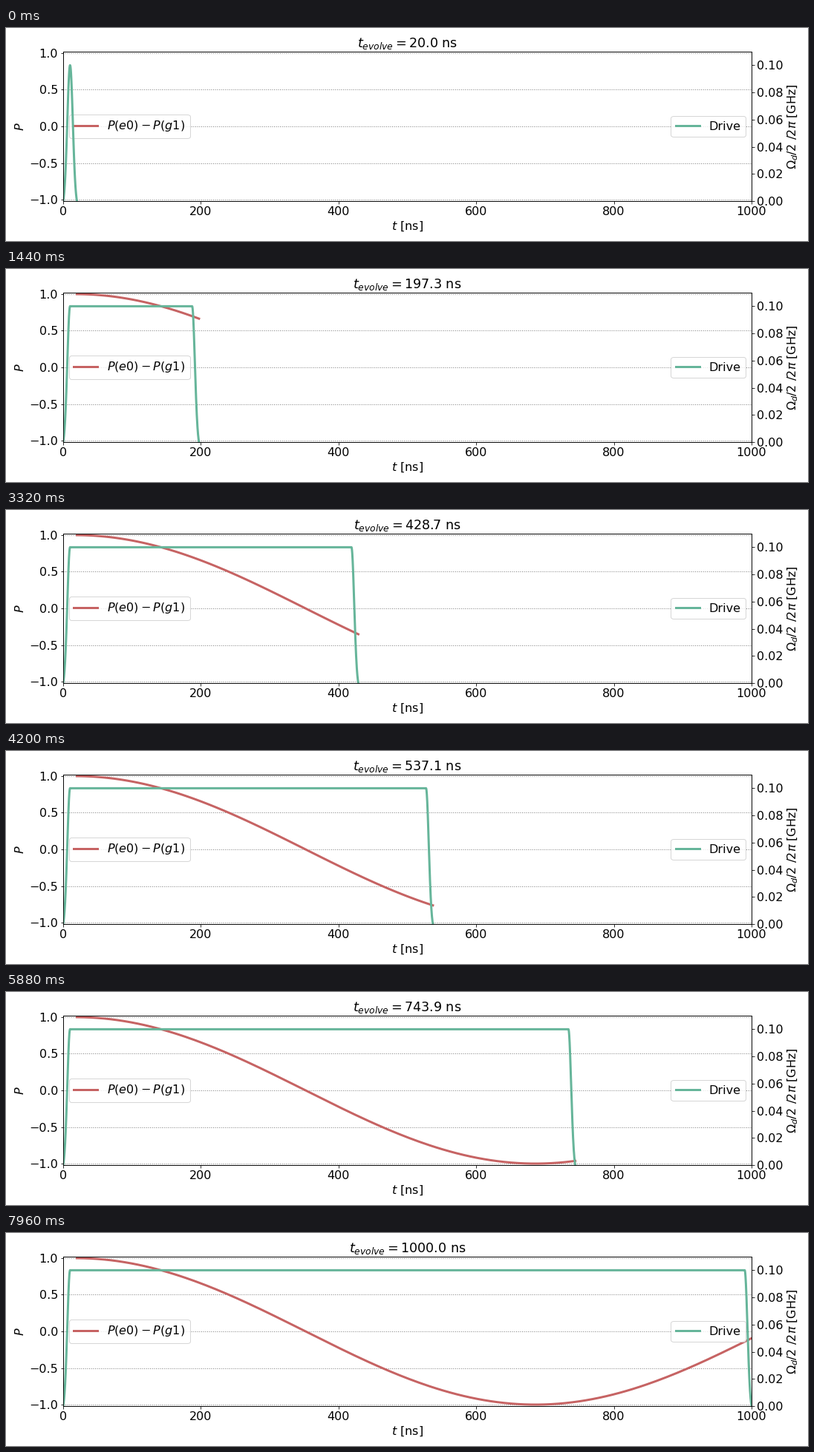
These frames come from a looping animation (1080x288 px, 8000 ms). A matplotlib script:

```python
import numpy as np
import matplotlib.pyplot as plt
from matplotlib.animation import FuncAnimation

WIDTH, HEIGHT, DPI = 1080, 288, 72
FRAMES, INTERVAL = 200, 40
T_MIN, T_MAX, RAMP = 20, 1000, 10
SIGMA = 4.0
AMPLITUDE = 0.1
RED, GREEN = "#c66363", "#66b59a"

plt.rcParams.update({"font.family": "DejaVu Sans", "font.size": 16})


def drive(t, t_end):
    """Flat pulse with Gaussian edges that start and end at zero."""
    outside = np.maximum(0, np.maximum(RAMP - t, t - (t_end - RAMP)))
    floor = np.exp(-RAMP**2 / (2 * SIGMA**2))
    edge = np.exp(-outside**2 / (2 * SIGMA**2))
    return AMPLITUDE * (edge - floor) / (1 - floor)


def population(t):
    return np.cos(np.pi * (t - 18) / 668)


fig = plt.figure(figsize=(WIDTH / DPI, HEIGHT / DPI), dpi=DPI)
left, right, top, bottom = 77, 1004, 32, 234
ax = fig.add_axes([left / WIDTH, 1 - bottom / HEIGHT,
                   (right - left) / WIDTH, (bottom - top) / HEIGHT])
ax.set(xlim=(0, T_MAX), ylim=(-1.02, 1.02), yticks=np.arange(-1, 1.1, 0.5))
ax.set_xlabel("$t$ [ns]")
ax.set_ylabel("$P$")
ax.grid(axis="y", color="gray", linestyle=":", linewidth=1)
title = ax.set_title("", fontsize=17.5)

drive_ax = ax.twinx()
drive_ax.set(ylim=(0, 0.11), yticks=np.arange(0, 0.11, 0.02))
drive_ax.set_ylabel(r"$\Omega_d/2\ /2\pi$ [GHz]")

pop_line, = ax.plot([], [], color=RED, linewidth=3, label="$P(e0)-P(g1)$")
drive_line, = drive_ax.plot([], [], color=GREEN, linewidth=3, label="Drive")
ax.legend(loc="center left")
drive_ax.legend(loc="center right")

times = np.linspace(T_MIN, T_MAX, FRAMES)


def update(frame):
    t_end = times[frame]
    shown = times[:frame + 1]
    pop_line.set_data(shown, population(shown))
    t = np.linspace(0, t_end, int(t_end * 5) + 1)
    drive_line.set_data(t, drive(t, t_end))
    title.set_text(rf"$t_{{evolve}} = {t_end:.1f}$ ns")
    return pop_line, drive_line, title


anim = FuncAnimation(fig, update, frames=FRAMES, interval=INTERVAL,
                     repeat=True, repeat_delay=0)
plt.show()
```
